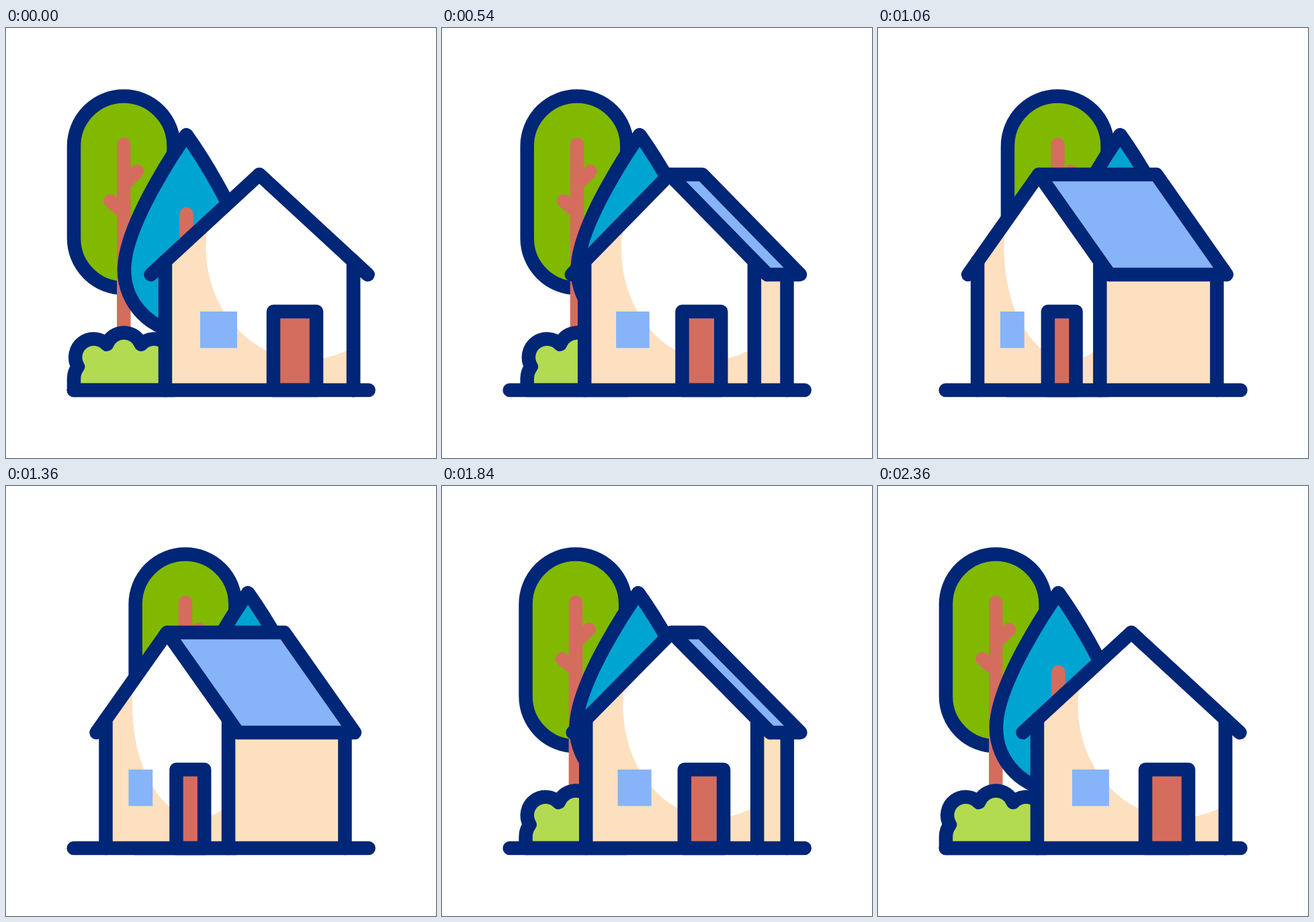
An HTML page with a canvas that plays this animation: 640x640 px, repeating every 2.4 s.

```html
<!DOCTYPE html>
<html lang="en">
<head>
<meta charset="utf-8">
<title>Turning house</title>
<style>
html, body { margin: 0; height: 100%; overflow: hidden; background: #fff; }
canvas { display: block; }
</style>
</head>
<body>
<canvas id="stage" width="640" height="640"></canvas>
<script>
const ctx = document.getElementById('stage').getContext('2d');
const NAVY = '#002677', GREEN = '#80b900', TEAL = '#00a4d1', CREAM = '#fde0bf',
  BLUE = '#87b4f8', RED = '#d56d5e', LIME = '#b2db52';
const LOOP = 2400, TURN = 1200, END = 2350, GROUND = 539, EAVE = 367, RIDGE = 218, WALL = 347;

const capsule = 'M101 175.8a74.3 74.3 0 0 1 148.6 0V313a74.3 74.3 0 0 1 -148.6 0Z';
const capsuleTrunk = 'M175.3 173.5V480M195 213.5L175.3 233M155.5 257.5L175.3 274';
const drop = 'M268.5 159C268.5 159 176 288 176 360C176 411 217.5 453 268.5 453' +
  'C319.5 453 361 411 361 360C361 288 268.5 159 268.5 159Z';
const dropTrunk = 'M268.5 277V500';
const bush = 'M101 539V522Q101 512 107 504A27.3 27.3 0 0 1 150 471A27.3 27.3 0 0 1 201 471' +
  'A27.3 27.3 0 0 1 244 504Q250 512 250 522V539Z';

// Symmetric ease: cubic-bezier(5/6, 0, 1/6, 1)
function ease(x) {
  let lo = 0, hi = 1;
  for (let i = 0; i < 30; i++) {
    const s = (lo + hi) / 2, r = 1 - s;
    if (2.5 * s * r * r + 0.5 * s * s * r + s * s * s < x) lo = s; else hi = s;
  }
  return lo * lo * (3 - 2 * lo);
}

function turnAt(t) {
  if (t < TURN) return ease(t / TURN);
  return t < END ? ease((END - t) / (END - TURN)) : 0;
}

function shape(d, fill, stroke) {
  const path = new Path2D(d);
  if (fill) { ctx.fillStyle = fill; ctx.fill(path); }
  if (stroke) { ctx.strokeStyle = stroke; ctx.stroke(path); }
}

const poly = (...points) => 'M' + points.map(p => p.join(' ')).join('L');

function draw(q) {
  const front = x => x - q * (89.5 + 0.352 * (x - 237));
  const left = front(237), right = front(517), apex = front(377), corner = front(538.5);
  const backWall = 517 - 12.7 * q, backEave = 538.5 - 19.8 * q, backTop = 377 + 37.5 * q;

  ctx.fillStyle = '#fff';
  ctx.fillRect(0, 0, 640, 640);
  ctx.lineWidth = 20.5;
  ctx.lineCap = ctx.lineJoin = 'round';

  ctx.save();
  ctx.translate(92.7 * q, 0);
  shape(capsule, GREEN, NAVY);
  shape(capsuleTrunk, null, RED);
  shape(drop, TEAL, NAVY);
  shape(dropTrunk, null, RED);
  shape(bush, LIME, NAVY);
  ctx.restore();

  // Side wall and roof slope
  shape(poly([right, EAVE], [backWall, EAVE], [backWall, GROUND], [right, GROUND]), CREAM);
  shape(poly([backWall, EAVE], [backWall, GROUND]), null, NAVY);
  shape(poly([apex, RIDGE], [backTop, RIDGE], [backEave, EAVE], [corner, EAVE]) + 'Z', BLUE, NAVY);

  // Front with its highlight
  const gable = poly([left, GROUND], [left, WALL], [apex, RIDGE], [right, WALL], [right, GROUND]);
  shape(gable, CREAM);
  ctx.save();
  ctx.clip(new Path2D(gable));
  ctx.fillStyle = '#fff';
  ctx.beginPath();
  ctx.ellipse(front(447.5), 327, 150 * (1 - 0.352 * q), 167, 0, 0, 2 * Math.PI);
  ctx.fill();
  ctx.restore();

  shape(poly([left, WALL], [left, GROUND]), null, NAVY);
  shape(poly([right, WALL], [right, GROUND]), null, NAVY);
  shape(poly([front(215.5), EAVE], [apex, RIDGE], [corner, EAVE]), null, NAVY);

  ctx.fillStyle = BLUE;
  ctx.fillRect(front(289), 422, front(344) - front(289), 54.3);
  const doorLeft = front(398), doorRight = front(462);
  shape(poly([doorLeft, 422], [doorRight, 422], [doorRight, GROUND], [doorLeft, GROUND]) + 'Z', RED, NAVY);
  shape(poly([100.7, GROUND], [539.7, GROUND]), null, NAVY);
}

function frame() {
  draw(turnAt(performance.now() % LOOP));
  requestAnimationFrame(frame);
}
frame();
</script>
</body>
</html>
```
